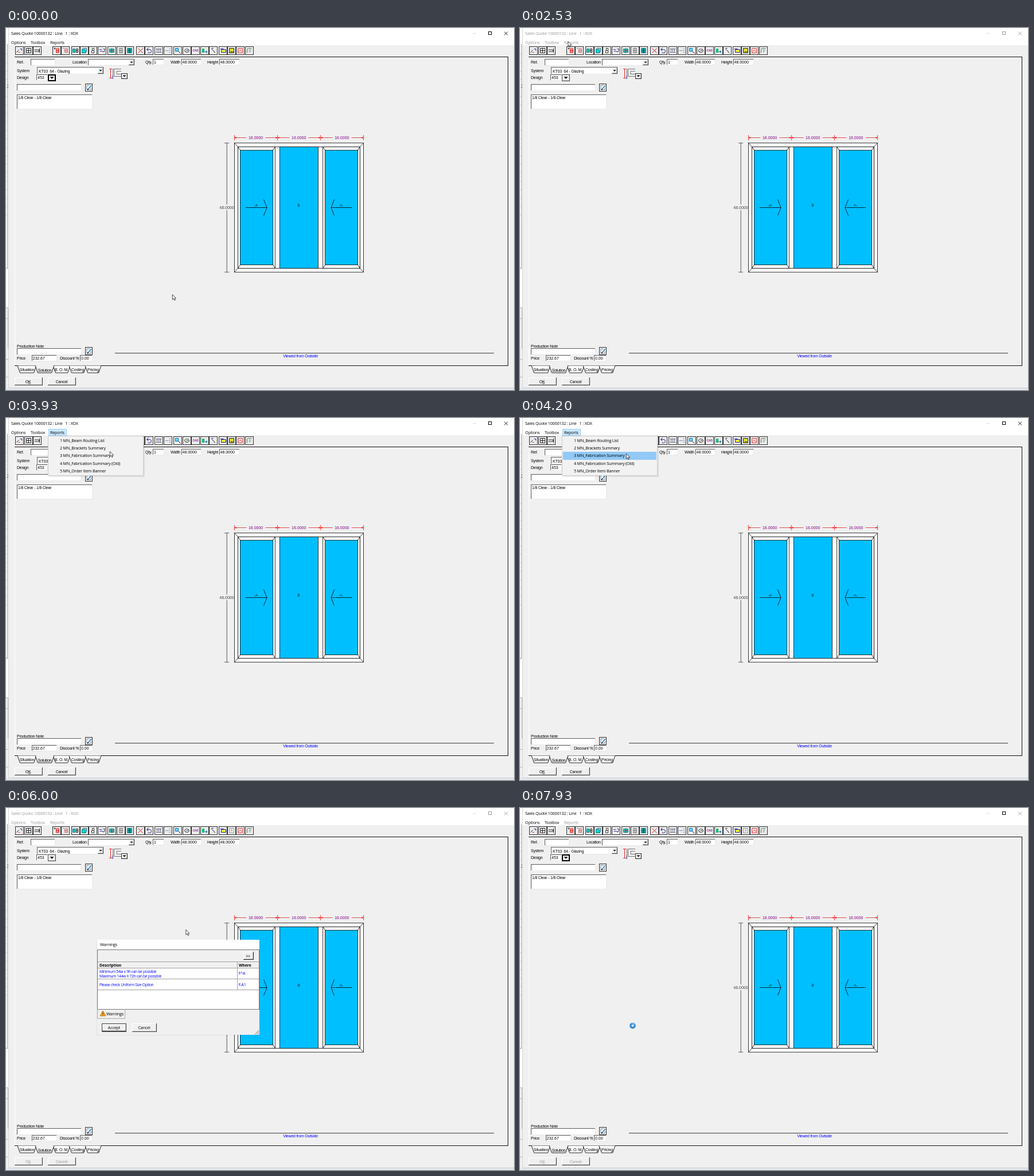
These frames come from a looping animation (886 px wide and 632 px high, 8000 ms). An HTML page:

```html
<!DOCTYPE html>
<html lang="en">
<head>
<meta charset="utf-8">
<title>Sales quote</title>
<style>
html, body { margin: 0; width: 100%; height: 100%; overflow: hidden; background: #f0f0f0; }
svg { display: block; width: 100%; height: 100%; }
rect, .crisp { shape-rendering: crispEdges; }
.plan rect, .plan path { shape-rendering: auto; stroke-width: .8px; }
text { white-space: pre; font: 7px "Liberation Sans", Arial, sans-serif; letter-spacing: -.22px; fill: #000; }
text.num { letter-spacing: 0; }
text.ui { font: 7.2px "Open Sans", "Noto Sans", sans-serif; letter-spacing: -.18px; }
text.row { font: 6.6px "Open Sans", "Noto Sans", sans-serif; letter-spacing: -.27px; fill: #00f; }
text.head { font: bold 6.8px "Open Sans", "Noto Sans", sans-serif; letter-spacing: -.08px; }
text.cad { font: bold 4.6px "Liberation Sans", Arial, sans-serif; letter-spacing: 0; fill: #80208c; }
.mid { text-anchor: middle; }

.ink, .menuInk, .okInk, .active, .off, .hot, .menu, .hover, .dialog, .arrow, .busy {
  animation: 8s step-end infinite;
}
.ink { animation-name: ink; }
.menuInk { animation-name: menuInk; }
.okInk { animation-name: okInk; }
.active { animation-name: active; }
.off { animation-name: off; }
.hot { animation-name: hot; }
.menu { animation-name: menu; }
.hover { animation-name: hover; }
.dialog { animation-name: dialog; }
.arrow { animation-name: arrow; }
.busy { animation-name: busy; }
.pointer { animation: move 8s linear infinite; }
.spin { animation: spin 1s linear infinite; }

@keyframes ink { 0%, 35.875%, 89.125%, 100% { color: #000 } .875%, 65% { color: #999 } }
@keyframes menuInk { 0%, 35.875% { color: #000 } .875%, 65%, 100% { color: #999 } }
@keyframes okInk { 0% { color: #000 } 65%, 100% { color: #a0a0a0 } }
@keyframes active { 0%, 35.875%, 89.125%, 100% { opacity: 1 } .875%, 65% { opacity: 0 } }
@keyframes off { 0% { opacity: 0 } 65%, 100% { opacity: 1 } }
@keyframes hot { 0%, 65%, 100% { opacity: 0 } 35.875% { opacity: 1 } }
@keyframes menu { 0%, 64.125%, 100% { opacity: 0 } 36.625% { opacity: 1 } }
@keyframes hover { 0%, 64.125%, 100% { opacity: 0 } 50.875% { opacity: 1 } }
@keyframes dialog { 0%, 89.125%, 100% { opacity: 0 } 65.875% { opacity: 1 } }
@keyframes arrow { 0%, 66.625% { opacity: 1 } 64.125%, 89.125%, 100% { opacity: 0 } }
@keyframes busy { 0%, 66.625% { opacity: 0 } 64.125%, 89.125%, 100% { opacity: 1 } }
@keyframes move {
  0%, 4.25% { transform: translate(290px, 465px); animation-timing-function: ease-in-out }
  11.625%, 15% { transform: translate(129px, 149px) }
  15.875%, 17.5% { transform: translate(128px, 149px) }
  18.375% { transform: translate(120px, 135px); animation-timing-function: ease-out }
  27.5%, 28.3% { transform: translate(68px, 25px) }
  31.625%, 44.25% { transform: translate(83.5px, 23px) }
  49.125% { transform: translate(181px, 58px); animation-timing-function: ease-out }
  52.5%, 66.5% { transform: translate(185px, 62px) }
  66.625%, 70% { transform: translate(187px, 63px) }
  75% { transform: translate(313.5px, 212px); animation-timing-function: ease-in-out }
  80.875% { transform: translate(203px, 377px) }
  84.125%, 89% { transform: translate(199px, 380px) }
  89.125%, 100% { transform: translate(196.5px, 380px) }
}
@keyframes spin { to { transform: rotate(360deg) } }
</style>
</head>
<body>
<svg id="stage" viewBox="0 0 886 632" preserveAspectRatio="none"></svg>
<script>
const GREY = '#f0f0f0', GLASS = '#00bfff';
const rect = (x, y, w, h, fill, more = '') => `<rect x="${x}" y="${y}" width="${w}" height="${h}" fill="${fill}" ${more}/>`;
const line = (d, color = '#000', w = 1, more = '') => `<path d="${d}" fill="none" stroke="${color}" stroke-width="${w}" ${more}/>`;
const shape = (d, fill, stroke = 'none') => `<path d="${d}" fill="${fill}" stroke="${stroke}"/>`;
const text = (x, y, s, cls = '', fill = '') =>
  `<text x="${x}" y="${y}" class="${cls}" ${fill && `style="fill:${fill}"`}>${s.replace(/</g, '&lt;').replace(/>/g, '&gt;')}</text>`;
const group = (cls, ...parts) => `<g class="${cls}">${parts.join('')}</g>`;
const box = (x, y, w, h, fill, stroke = '#000') => rect(x + .5, y + .5, w - 1, h - 1, fill, `stroke="${stroke}"`);
const hair = (d, color) => line(d, color, 1, 'class="crisp"');

// Sunken field and raised button
const field = (x, y, w, h) => rect(x, y, w, h, '#fff') +
  hair(`M${x + .5} ${y + h}V${y + .5}H${x + w}`, '#5c5c5c') + hair(`M${x} ${y + h - .5}H${x + w - .5}V${y}`, '#e9e9e9');
const button = (x, y, w, h) => rect(x, y, w, h, GREY) +
  hair(`M${x + .5} ${y + h}V${y + .5}H${x + w}`, '#fff') +
  hair(`M${x + 1} ${y + h - 1.5}H${x + w - 1.5}V${y + 1}`, '#c8c8c8') +
  hair(`M${x} ${y + h - .5}H${x + w - .5}V${y}`, '#444');
const down = (x, y, r = 2.5) => shape(`M${x - r} ${y - r / 2}h${2 * r}l${-r} ${r}z`, '#000');
const combo = (x, y, w, h) => field(x, y, w, h) + button(x + w - 11, y + 1, 10, h - 2) + down(x + w - 6, y + h / 2);
const pen = (x, y) => box(x, y, 13, 14, GREY, '#333') + rect(x + 3, y + 3, 7, 8, '#fff') +
  line(`M${x + 3} ${y + 3}h5M${x + 3} ${y + 3}v8h7v-4`, '#667', .8) +
  line(`M${x + 5} ${y + 10}l6-7`, '#1c86c4', 1.6) + line(`M${x + 4} ${y + 11}l1.5-1.7`, '#000', 1.2);

// Each mark: stroke, path, optional fill
const grid = 'M-4-4h8v8h-8zM0-4v8M-4 0h8';
const icons = [
  [23, ['#222', 'M-5 3l4-4'], ['#d33', 'M-2 3h3'], ['#22a', 'M1-3h3v3']],
  [39, ['#222', grid, '#fff']],
  [54, ['#333', 'M-5-1.5h8v3h-8M4-4v8']],
  [88, ['#d22', 'M-1-3.5h5v7h-5zM-1 0h5', '#f99'], ['#222', 'M-5-4h3M-3.5-5v3']],
  [103, ['#c77', 'M-1-3.5h5v7h-5zM-1 0h5', '#dbb'], ['#888', 'M-5-4h3']],
  [121, ['#077', 'M-5-3h4v6h-4z', '#0cc'], ['#111', 'M1-3h3v6h-3zM1 0h3']],
  [136, ['#077', 'M-4-2h6v6h-6z', '#0dd'], ['#067', 'M-4-2l2-2h6v6l-2 2']],
  [151, ['#333', 'M-2 0h4v4h-4zM-1 0v-4h3v4', '#fff']],
  [167, ['#33c', 'M-5-2h5M-4 1h5'], ['#333', 'M2-3h3l-1 5h-3']],
  [184, ['#088', 'M-4-3h8v6h-8z', '#3bb'], ['#a33', 'M0-4v8M-3 0h6']],
  [200, ['#777', 'M-3-4h6v8h-6zM0-4v8M-3 0h6', '#ddd']],
  [215, ['#088', 'M-4-4h8v8h-8zM-4 0h8', '#0cc'], ['#222', 'M-1-4v8M1-4v8']],
  [234, ['#e11', 'M-4-4l8 8M4-4l-8 8']],
  [249, ['#228', 'M-4-2h5q3 0 3 3t-3 3h-3M-1-5l-3 3 3 3']],
  [266, ['#668', 'M-5-3h10M-3-3v5M3-3v5M0-3v5M-5 3h10']],
  [282, ['#79b', 'M-5 0h6M2-3h3M2 0h3M2 3h3']],
  [299, ['#16c', 'M-4-4h5v5h-5z', '#6df'], ['#222', 'M1 1l4 4']],
  [315, ['#222', 'M-4-1l3-2 4 1 1 3-3 2-4-1zM-1 0h3', '#fff']],
  [330],
  [346, ['#0a6', 'M-4-3h3v6h-3z', '#0c8'], ['#06a', 'M0 2h5M3 0v4']],
  [361, ['#22a', 'M-3-3l5 5'], ['#222', 'M-3-4h3M1 1l2 3']],
  [378, ['#229', 'M-5-3h6M-3 3h8v-5h-8z', '#ee4']],
  [393, ['#222', 'M-4-4h8v8h-8z', '#dd3'], ['#222', 'M-2 2h5']],
  [408, ['#d44', 'M-4-4h8v8h-8zM-3 2l3-3 3 3', '#fdd']],
  [424, ['#575', 'M4-4h-6q-2 0-2 2v6M-1-1h4M-1 2h3']]
];
const tool = ([x, ...marks]) => box(x - 7, 32, 15, 15, '#ececec', '#333') +
  `<g transform="translate(${x + .5} 39.5)">${marks.map(([c, d, fill = 'none']) => `<path d="${d}" fill="${fill}" stroke="${c}"/>`).join('')}</g>`;

const backdrop = () => rect(0, 0, 886, 632, GREY) + rect(0, 0, 4, 488, '#fff') +
  Array.from({ length: 20 }, (_, i) => hair(`M0 ${45.5 + i * 14.8}h2`, '#ddd')).join('') +
  hair('M2.5 28V419M0 419.5h3', '#999') + hair('M2 99.5h3M2 103.5h3', '#555') +
  hair('M0 488.5h3.5V560M0 507.5h3M0 578.5h4M0 609.5h4', '#b5b5b5') +
  rect(4, 0, 882, 30, '#fff') + hair('M4.5 0V628', '#d6d6d6') +
  rect(0, 629, 886, 3, '#e5eaf0') + hair('M4 628.5H886', '#c3c8ce');

const tint = (cls, s) => `<g class="${cls}">${s.replace(/class="ui"/g, 'class="ui" style="fill:currentColor"')}</g>`;

const caption = () =>
  tint('ink', text(9, 12, 'Sales Quote 10000132 : Line   1 : XOX', 'ui') +
    text(9, 27.5, 'Options', 'ui') + text(43, 27.5, 'Toolbox', 'ui') +
    rect(841.5, 6.5, 5, 5, 'none', 'stroke="currentColor"')) +
  hair('M814 9.5h6', '#ddd') +
  group('hot', box(74, 19, 32, 12, '#cce8ff', '#99d1ff')) +
  tint('menuInk', text(77, 27.5, 'Reports', 'ui') + line('M869 6.5l6 6M875 6.5l-6 6', 'currentColor', .9));

const form = () => hair('M15.5 590V51', '#fff') + hair('M15 50.5H875.5V589.5H15', '#111') +
  text(19, 62, 'Ref.') + field(43, 54, 43, 12) +
  text(116, 62, 'Location') + combo(143, 54, 82, 12) +
  text(243, 62, 'Qty.') + field(256, 54, 20, 11) + text(258, 62, '1', 'num') +
  text(287, 62, 'Width') + field(306, 54, 35, 11) + text(307.5, 62, '48.0000', 'num') +
  text(351, 62, 'Height') + field(372, 54, 36, 11) + text(373.5, 62, '48.0000', 'num') +
  text(19, 77, 'System') + combo(54, 68, 117, 13) + text(57, 77.5, 'KT03  64 - Glazing') +
  text(19, 89, 'Design') + field(53, 81, 20, 11) + text(55, 89, '453', 'num') +
  button(73, 81, 14, 12) + box(73, 81, 14, 12, 'none', '#555') +
  group('active', rect(74, 82, 12, 10, 'none', 'stroke="#000" stroke-width="2"')) + down(80, 87, 3.5) +
  line('M182.5 72v15M180 71.5h5M180 87.5h5', '#e22') + line('M186 83v6', '#55f') +
  line('M201 71.5h-12.5v13H201M201 75.5h-8v5h8M186.5 71v18', '#555', .8) +
  button(201, 79, 11, 10) + box(201, 79, 11, 10, 'none', '#333') + down(206.5, 84, 3) +
  field(19, 98, 113, 12) + pen(138, 97) +
  field(19, 116, 132, 26) + text(21, 124, '1/8 Clear - 1/8 Clear') +
  text(19, 558, 'Production Note') + field(19, 559, 113, 12) + pen(138, 557) +
  text(19, 579, 'Price') + field(45, 571, 44, 11) + text(46.5, 579, '232.67', 'num') +
  text(94, 579, 'Discount %') + field(129, 571, 22, 11) + text(131, 579, '0.00', 'num') +
  line('M190 567.7H851', '#000', .8) + text(513.5, 575, 'Viewed from Outside', 'mid', '#00f');

const tabs = () => [[20, 53, 'Situation'], [82, 112, 'B. O. M.'], [110, 140, 'Costing'], [138, 166, 'Pricing'], [51, 84, 'Solution']]
  .map(([a, b, s], i) => shape(`M${a} 589.5l4.5 12.5H${b - 4.5}l4.5-12.5`, i == 4 ? GREY : '#fff', '#222') +
    text((a + b) / 2, i == 4 ? 599.5 : 599, s, 'mid')).join('') + hair('M53 589.5h29', GREY);

const footer = () => button(15, 610, 49, 14) + button(73, 610, 49, 14) +
  `<g class="okInk">${text(38.5, 619.5, 'OK', 'mid', 'currentColor')}${line('M39 621h4', 'currentColor', .7)}${text(97, 619.5, 'Cancel', 'mid', 'currentColor')}</g>`;

// Window elevation: outer frame, two sashes, three panes, dimensions
const panel = (x, y, x2, y2, fill) => rect(x, y, x2 - x, y2 - y, fill, 'stroke="#000"');
const sash = (x, x2) => panel(x, 207.4, x2, 419.6, '#fff') + panel(x + 3.9, 213.3, x2 - 3.6, 413.5, GLASS) +
  line(`M${x} 207.4l3.9 5.9M${x2} 207.4l-3.6 5.9M${x} 419.6l3.9-6.1M${x2} 419.6l-3.6-6.1`);
const edges = [398.4, 473.5, 548.6, 623.6];
const drawing = () => group('plan',
  panel(398.4, 200.8, 623.6, 426.2, '#fff'), panel(404.5, 207.4, 617.3, 419.6, '#fff'),
  line('M398.4 200.8l6.1 6.6M623.6 200.8l-6.3 6.6M398.4 426.2l6.1-6.6M623.6 426.2l-6.3-6.6'),
  sash(404.5, 469.3), sash(552.7, 617.3), panel(477.6, 207.4, 544.4, 419.6, GLASS),
  line('M418 313.5h37M567 313.5h36M449.5 299.5l5.5 14-5.5 14M572.5 299.5l-5.5 14 5.5 14'),
  text(436, 312, '->', 'mid'), text(585, 312, '<-', 'mid'), text(510.5, 312, '0', 'num mid'),
  ...edges.slice(0, 3).map(x => line(`M${x} 191.5h21M${x + 54} 191.5h21`, '#d8262c') +
    text(x + 37.2, 194, '16.0000', 'num mid', '#800080')),
  ...edges.map((x, i) => line(`M${x} 187v9`, '#f00') +
    (i < 3 ? shape(`M${x} 191.5l3-1.5v3z`, '#f00') : '') + (i ? shape(`M${x} 191.5l-3-1.5v3z`, '#f00') : '')),
  line('M385.2 201V308M385.2 318V426M381 200.8h8M381 426.2h8', '#333'), text(385, 316, '48.0000', 'num mid', '#444'));

const reports = ['MN_Beam Routing List', 'MN_Brackets Summary', 'MN_Fabrication Summary', 'MN_Fabrication Summary (Old)', 'MN_Order Item Banner'];
const popup = () => group('menu',
  rect(75, 33, 167, 70, '#000', 'opacity=".08"'), box(73, 31, 167, 70, '#f2f2f2', '#ccc'),
  group('hover', rect(75, 59, 163, 14, '#91c9f7')),
  ...reports.map((s, i) => text(94, 41.5 + i * 13.35, `${i + 1} ${s}`, 'ui')));

const warnings = () => group('dialog',
  rect(158, 231, 285, 166, '#000', 'opacity=".06"'), rect(159, 230, 283, 166, GREY), rect(159, 230, 283, 18, '#fff'),
  text(164, 241, 'Warnings', 'ui'),
  button(414, 251, 18, 14), hair('M414 264.5h17.5V251', '#222'), text(422, 260.5, '>>', 'mid'),
  rect(160, 268, 281, 83, '#fff'), rect(160, 268, 281, 11, GREY),
  hair('M160 268.5H441M160 279.5H441M403.5 268V317M160 298.5H441M160 317.5H441', '#a0a0a0'),
  hair('M159.5 351V247.5H441.5V351H159', '#777'),
  text(163, 276.5, 'Description', 'head'), text(406, 276.5, 'Where', 'head'),
  text(163, 287.8, 'Minimum 54w x 9h can be possible', 'row'), text(163, 295.8, 'Maximum 144w X 72h can be possible', 'row'),
  text(163, 310.5, 'Please check Uniform Size Option', 'row'),
  text(405.5, 291.3, 'F^A', 'ui', '#00f'), text(405.5, 310.5, 'F.A1', 'ui', '#00f'),
  hair('M159.5 351V367.5H207.5V351', '#aaa'),
  shape('M169 354l5 9h-10z', '#f7a823', '#c87a10'), line('M169 357v3M169 361v1', '#222'),
  text(175, 361.5, 'Warnings', 'ui'),
  button(167, 376, 43, 14), box(167, 376, 43, 15, 'none', '#444'), button(220, 376, 43, 15),
  text(188.5, 386, 'Accept', 'ui mid'), text(241, 386, 'Cancel', 'ui mid'),
  line('M434 395l7-7M437 395l4-4M440 395l1-1', '#777'));

const pointer = () => group('pointer',
  group('arrow', `<path d="M.3.3V9.2L2.4 7.3 3.8 10.5 5.3 9.9 3.9 6.8H6.5Z" fill="#fff" stroke="#111" stroke-width=".75"/>`),
  group('busy', `<circle r="3.7" fill="#fff" stroke="#2f86d6" stroke-width="3.2"/>`,
    group('spin', line('M0-3.7A3.7 3.7 0 0 1 3.7 0', '#7cc0f5', 2))));

document.getElementById('stage').innerHTML = backdrop() + caption() +
  icons.map(tool).join('') + text(330.5, 41, 'CAD', 'cad mid') +
  group('off', rect(388, 34, 12, 11, '#ececec'), line('M389.5 35.5h8v8h-8zM392 38h3M392 40h3', '#999')) +
  form() + tabs() + footer() + drawing() + popup() + warnings() + pointer();
</script>
</body>
</html>
```
